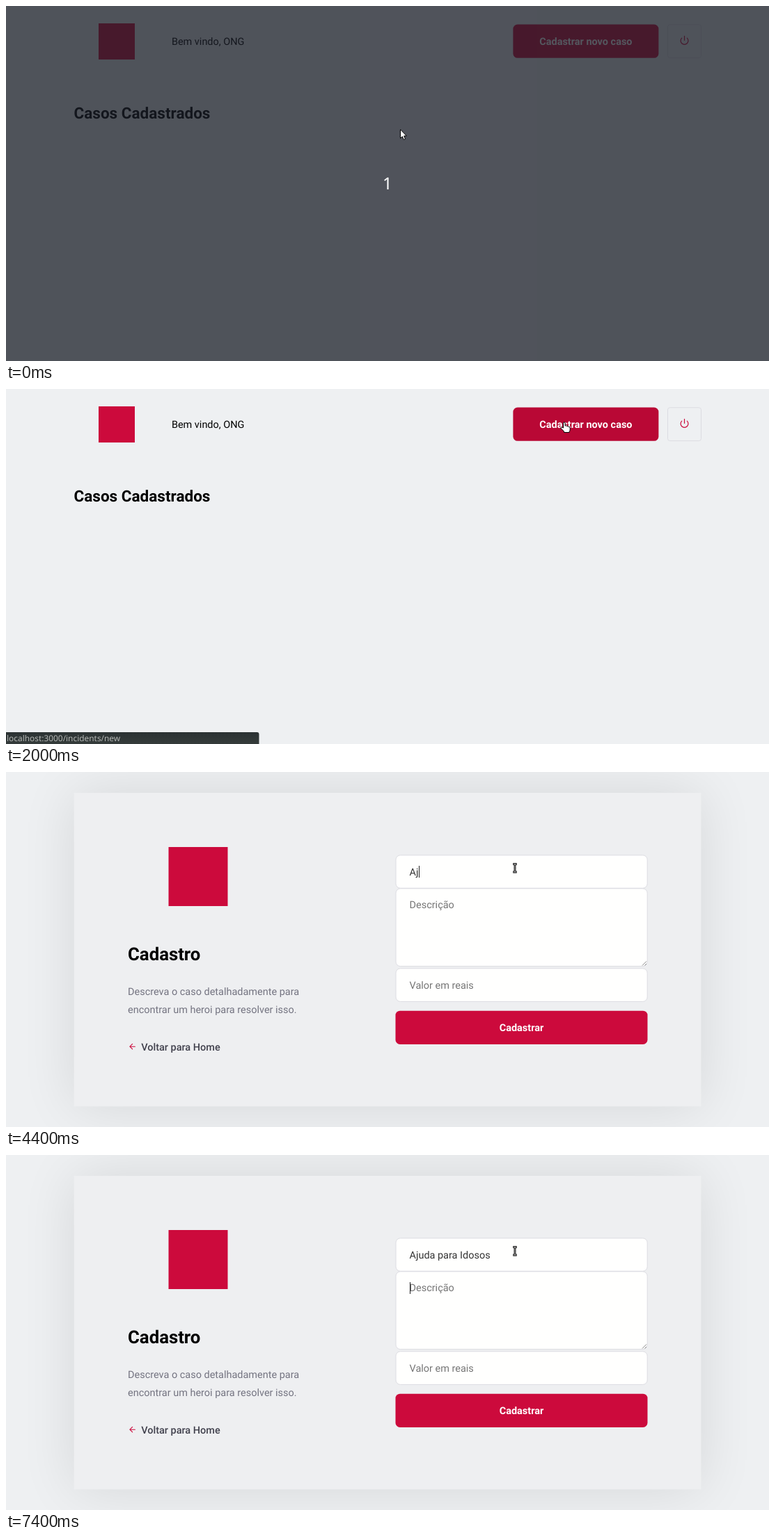
Write an HTML page that moves like this. It is 1096 px wide and 511 px high and loops after 8000 ms.

```html
<!DOCTYPE html>
<html lang="pt-BR">
<head>
<meta charset="utf-8">
<title>Cadastro de casos</title>
<style>
  :root { --page: #eef0f2; --red: #cc0a3c; --line: #dcdce2; }
  html, body { margin: 0; width: 100%; height: 100%; overflow: hidden; background: var(--page); }
  svg { display: block; width: 1096px; height: 511px; }
  text { font: 14.47px Roboto, sans-serif; text-rendering: geometricPrecision; white-space: pre; }
  .bold { font-weight: 700; }
  .button { fill: var(--red); }
  .label { fill: #fff; text-anchor: middle; font-weight: 700; }
  .field { fill: #fffffe; stroke: var(--line); }
  .hint { fill: #757575; }
  .icon { fill: none; stroke: var(--red); stroke-width: 2; stroke-linecap: round; stroke-linejoin: round; }
  .cursor { fill: #fff; stroke: #000; stroke-linejoin: round; }

  /* Everything shares one 8 s clock and changes in hard steps. */
  .step { animation: 8s step-end infinite; }
  .hidden { opacity: 0; }

  .list { animation-name: list; }
  .form { animation-name: form; }
  .dim { animation-name: dim; }
  .hover { animation-name: hover; }
  .status { animation-name: status; }
  .pointer { animation-name: pointer; }
  .arrow { animation-name: arrow; }
  .hand { animation-name: hand; }
  .beam { animation-name: beam; }
  .typing { animation-name: typing; }
  .caret { animation-name: caret; }
  .title-hint { animation-name: title-hint; }
  .next-caret { animation-name: next-caret; }

  @keyframes list { 0% { opacity: 1 } 30%, 100% { opacity: 0 } }
  @keyframes form { 0% { opacity: 0 } 30%, 100% { opacity: 1 } }
  @keyframes dim { 0% { opacity: 1 } 5%, 100% { opacity: 0 } }
  @keyframes hover { 0% { fill: #cc0a3c } 25%, 100% { fill: #b90835 } }
  @keyframes status { 0% { opacity: 0 } 25% { opacity: 1 } 32.5% { opacity: .5 } 35%, 100% { opacity: 0 } }
  @keyframes pointer {
    0% { transform: translate(566px, 177px) }
    10% { transform: translate(687px, 80px) }
    12.5% { transform: translate(723px, 58px) }
    17.5% { transform: translate(720px, 58px) }
    20% { transform: translate(755px, 150px) }
    22.5% { transform: translate(781px, 113px) }
    25% { transform: translate(796px, 47px) }
    30% { transform: translate(802px, 50px) }
    32.5% { transform: translate(799px, 54px) }
    35%, 100% { transform: translate(727px, 131px) }
  }
  @keyframes arrow {
    0%, 20%, 30% { opacity: 1 }
    17.5%, 25%, 35%, 100% { opacity: 0 }
  }
  @keyframes hand {
    0%, 20%, 30%, 100% { opacity: 0 }
    17.5%, 25% { opacity: 1 }
  }
  @keyframes beam { 0% { opacity: 0 } 35%, 100% { opacity: 1 } }
  @keyframes typing {
    0% { transform: none }
    55% { transform: translateX(13px) }
    57.5% { transform: translateX(29px) }
    60% { transform: translateX(40px) }
    67.5% { transform: translateX(48px) }
    70% { transform: translateX(61px) }
    75% { transform: translateX(72px) }
    80% { transform: translateX(76px) }
    82.5% { transform: translateX(84px) }
    87.5% { transform: translateX(100px) }
    90%, 100% { transform: translateX(115px) }
  }
  @keyframes caret {
    0%, 47.5%, 92.5%, 100% { opacity: 0 }
    42.5%, 55% { opacity: 1 }
  }
  @keyframes title-hint { 0% { opacity: 1 } 55%, 100% { opacity: 0 } }
  @keyframes next-caret { 0% { opacity: 0 } 92.5%, 100% { opacity: 1 } }
</style>
</head>
<body>
<svg viewBox="0 0 1096 511">
  <defs>
    <linearGradient id="bar" x2="0" y2="1">
      <stop stop-color="#2b3233"/>
      <stop offset="1" stop-color="#353c3b"/>
    </linearGradient>
  </defs>
  <rect width="1096" height="511" fill="#eef0f2"/>

  <g class="step list">
    <rect class="button" x="133" y="25" width="52" height="52"/>
    <text x="237.9" y="56.2">Bem vindo, ONG</text>
    <rect class="button step hover" x="728.4" y="26.6" width="209" height="48.2" rx="6.4"/>
    <text class="label" x="832.9" y="55.7">Cadastrar novo caso</text>
    <rect x="950.5" y="26.8" width="48" height="47.8" rx="3.2" fill="none" stroke="#dcdce2"/>
    <g class="icon" transform="translate(967.3 42.1) scale(.603)">
      <path d="M18.36 6.64a9 9 0 1 1-12.73 0M12 2V12"/>
    </g>
    <text class="bold" x="97.5" y="162" style="font-size:22.5px">Casos Cadastrados</text>
  </g>

  <g class="step form hidden">
    <rect x="97.8" y="30" width="900.6" height="451.3" opacity=".1" style="filter:blur(40px)"/>
    <rect x="97.8" y="30" width="900.6" height="451.3" fill="#eeeff1"/>
    <rect class="button" x="233.5" y="108" width="85" height="85"/>
    <text class="bold" x="175" y="271.4" style="font-size:25.73px">Cadastro</text>
    <g fill="#737380">
      <text x="175" y="321.2">Descreva o caso detalhadamente para</text>
      <text x="175" y="346.9">encontrar um heroi para resolver isso.</text>
    </g>
    <g class="icon" transform="translate(175.2 388.8) scale(.536)">
      <path d="M19 12H5M12 19l-7-7 7-7"/>
    </g>
    <text x="194.2" y="400.9" fill="#41414d" font-weight="500" style="font-weight:500">Voltar para Home</text>

    <rect class="field" x="560" y="119.8" width="361.2" height="47.4" rx="6.4"/>
    <rect class="field" x="560" y="167.8" width="361.2" height="111.8" rx="6.4"/>
    <rect class="field" x="560" y="282.8" width="361.2" height="47.6" rx="6.4"/>
    <path d="M914 278.5l6-6M917.5 278.5l2.5-2.5" stroke="#777" stroke-width=".9"/>

    <text x="579.5" y="148.9" fill="#333">Ajuda para Idosos</text>
    <g class="step typing">
      <rect x="581" y="132" width="120" height="23" fill="#fffffe"/>
    </g>
    <text class="hint step title-hint" x="579.5" y="148.9">Titulo</text>
    <g class="step typing">
      <rect class="step caret hidden" x="580" y="135" width="1" height="17" fill="#222"/>
    </g>
    <text class="hint" x="579.5" y="195.7">Descrição</text>
    <rect class="step next-caret hidden" x="580" y="183" width="1" height="17" fill="#222"/>
    <text class="hint" x="579.5" y="312.3">Valor em reais</text>

    <rect class="button" x="559.5" y="343.7" width="362" height="48.2" rx="6.4"/>
    <text class="label" x="740.5" y="372.9">Cadastrar</text>
  </g>

  <g class="step status hidden">
    <path d="M0 494H360.5q3 0 3 3V511H0z" fill="url(#bar)"/>
    <text x="1" y="507" fill="#b3b6b4" style="font:11.9px 'Noto Sans',sans-serif">localhost:3000/incidents/new</text>
  </g>

  <g class="step dim">
    <rect width="1096" height="511" fill="#1a1e27" fill-opacity=".745"/>
    <text x="541" y="264" fill="#fff" style="font:24px 'Noto Sans',sans-serif">1</text>
  </g>

  <g class="step pointer">
    <path class="cursor step arrow" d="M.5.8V13.4L3.3 10.8 5.3 15.4 7.5 14.4 5.6 10H9.4z"/>
    <path class="cursor step hand hidden" d="M4.5 9V2.2a1.3 1.3 0 0 1 2.6 0V6q2-.8 2.5.6 2-.6 2.4.8 2.2-.3 2.2 1.6V12q0 1.2-1 2.2V15.5H5.6V14L1.2 9.8Q.4 8.2 2 7.7z"/>
    <g class="step beam hidden" fill="none">
      <path d="M1.3 1.5H3Q4 1.5 4 2.5 4 1.5 5 1.5H6.7M4 2.5V12M1.3 13H3Q4 13 4 12 4 13 5 13H6.7" stroke="#000" stroke-width="2.8"/>
      <path d="M1.8 1.5H6.2M4 1.5V13M1.8 13H6.2" stroke="#fff" stroke-width=".7"/>
    </g>
  </g>
</svg>
</body>
</html>
```
